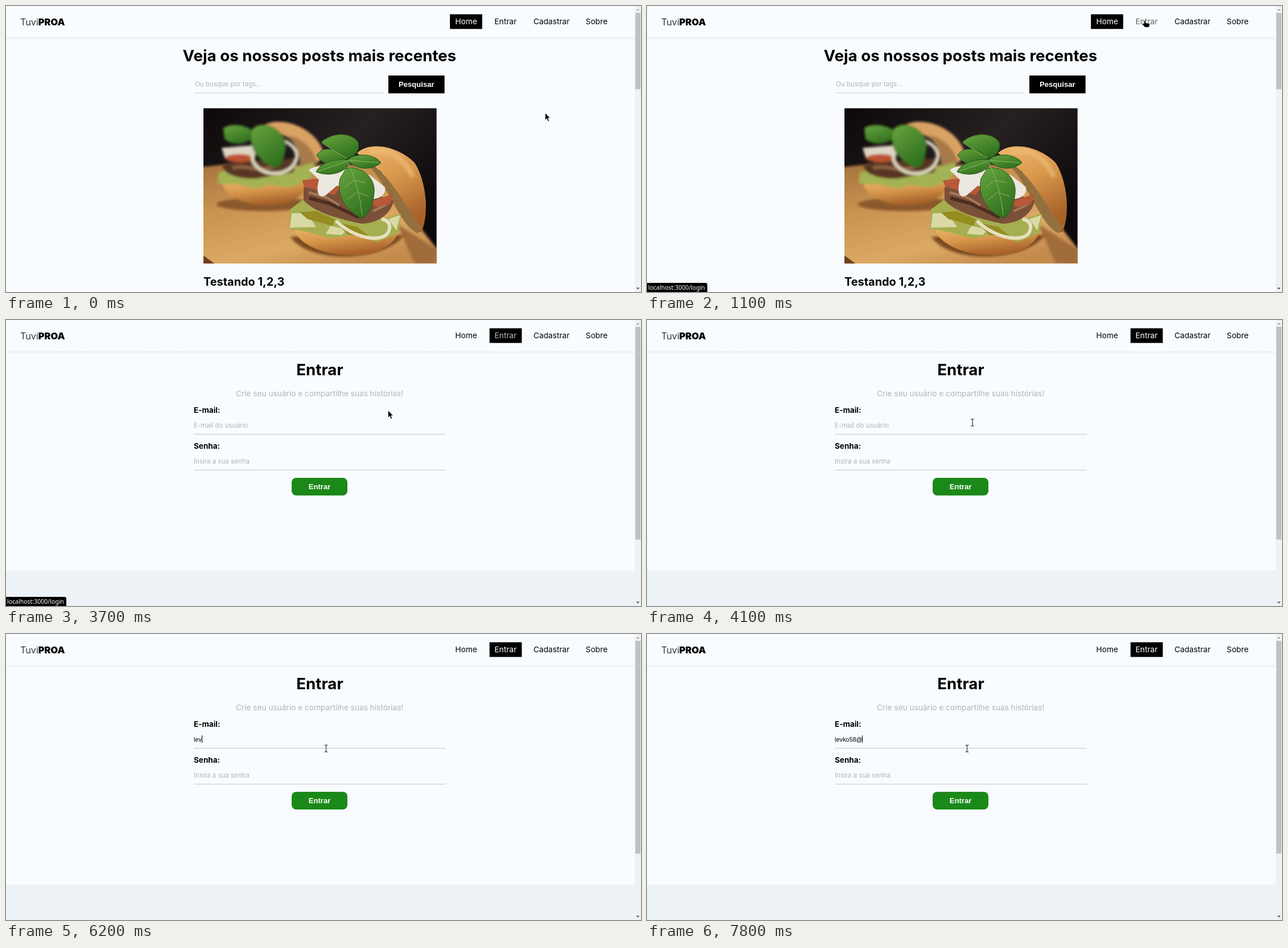
Recreate the animation shown at these times as an HTML page. Size 1116 px wide and 502 px high, loop 8 s.

```html
<!DOCTYPE html>
<html lang="pt">
<head>
<meta charset="utf-8">
<title>Blog</title>
<style>
html, body { margin: 0; width: 100%; height: 100%; overflow: hidden; background: #f8fcff; }
svg { display: block; }
text { font: 13.7px Inter, sans-serif; white-space: pre; }
.mid { text-anchor: middle; }
.h1 { font-size: 27.7px; font-weight: 700; }
.h2 { font-size: 19.9px; font-weight: 700; }
.label { font-size: 13.5px; font-weight: 700; }
.hint { font-size: 11.5px; fill: #b2b5b7; }
.button { font: 700 13.07px "Liberation Sans", Arial, sans-serif; fill: #fff; }
.typed { font: 10.89px "Liberation Sans", Arial, sans-serif; }
.line { stroke: #c4c8ca; }
.leaf { fill: url(#leaf); stroke: #28591a; }
</style>
</head>
<body>
<svg width="1116" height="502" viewBox="0 0 1116 502">
  <defs>
    <linearGradient id="dark" x2="1" y2=".6">
      <stop stop-color="#0d0809"/><stop offset=".55" stop-color="#272021"/><stop offset="1" stop-color="#0c090a"/>
    </linearGradient>
    <linearGradient id="wood" x2=".6" y2="1">
      <stop stop-color="#a5733f"/><stop offset=".35" stop-color="#c8924f"/><stop offset=".75" stop-color="#dba965"/><stop offset="1" stop-color="#c48b4c"/>
    </linearGradient>
    <linearGradient id="bun" x2=".4" y2="1">
      <stop stop-color="#edb86f"/><stop offset=".5" stop-color="#d8964a"/><stop offset="1" stop-color="#a7622a"/>
    </linearGradient>
    <linearGradient id="leaf" x2=".6" y2="1">
      <stop stop-color="#68a53f"/><stop offset="1" stop-color="#31701f"/>
    </linearGradient>
    <linearGradient id="shade" x2="0" y2="1">
      <stop stop-color="#e9eef1"/><stop offset="1" stop-color="#f8fcff"/>
    </linearGradient>
    <filter id="soft"><feGaussianBlur stdDeviation="2"/></filter>
    <filter id="crisp"><feGaussianBlur stdDeviation=".6"/></filter>
    <clipPath id="frame"><path d="M347 179.500H756.700V452H347Z"/></clipPath>
  </defs>

  <rect width="1116" height="502" fill="#f8fcff"/>
  <rect y="55" width="1105" height="5" fill="url(#shade)"/>
  <text x="25" y="33.500" style="font-size:16.400px;font-weight:300">Tuvi<tspan font-weight="900">PROA</tspan></text>

  <rect id="active" y="14.500" width="56.700" height="25.800"/>
  <text id="home" class="mid" x="808.700" y="32">Home</text>
  <text id="enter" class="mid" x="878" y="32">Entrar</text>
  <text class="mid" x="958.700" y="32">Cadastrar</text>
  <text class="mid" x="1038" y="32">Sobre</text>

  <g id="posts">
    <text class="mid h1" x="551" y="97">Veja os nossos posts mais recentes</text>
    <text class="hint" x="332" y="141">Ou busque por tags...</text>
    <path class="line" d="M332 152.500H664"/>
    <rect x="672" y="122" width="98.700" height="31.300"/>
    <text class="mid button" x="721.300" y="142">Pesquisar</text>
    <text class="h2" x="347" y="490.500">Testando 1,2,3</text>
    <g clip-path="url(#frame)">
      <rect x="347" y="179" width="410" height="274" fill="url(#dark)"/>
      <path d="M340 283L378 279H640L690 340L764 435V460H340Z" fill="url(#wood)" filter="url(#soft)"/>
      <path d="M688 383L757 428V452H718Z" fill="#a06c3a" filter="url(#soft)"/>
      <path d="M340 433L372 456H340Z" fill="#6b401d"/>
      <g filter="url(#soft)">
        <ellipse cx="455" cy="348" rx="85" ry="12" fill="#8a5829"/>
        <path d="M453 209C480 194 545 208 560 262L545 277C525 248 490 225 453 209Z" fill="#d9a264"/>
        <path d="M492 228C510 225 540 245 547 276L516 292C519 260 510 240 492 228Z" fill="#a87a48"/>
        <path d="M379 309C386 338 425 350 460 349C500 348 527 335 532 305Z" fill="url(#bun)"/>
        <path d="M374 292C395 285 490 296 541 274C548 296 527 316 490 318L462 314L440 321L410 313L372 312Z" fill="#a3b352"/>
        <path d="M381 279C400 268 480 275 513 265L505 292L440 303C410 304 380 296 381 279Z" fill="#593622"/>
        <path d="M398 284C420 278 440 292 470 283" fill="none" stroke="#8e6345" stroke-width="6"/>
        <path d="M379 249L440 244L437 272L385 268Z" fill="#ddd6c4"/>
        <ellipse cx="410" cy="267" rx="25" ry="7" fill="#bd5231"/>
        <ellipse cx="472" cy="264" rx="39" ry="30" fill="none" stroke="#dcd6bd" stroke-width="6"/>
        <path class="leaf" d="M382 214C400 204 425 210 438 222C437 240 400 249 384 233Z"/>
        <path class="leaf" d="M431 219C450 193 497 220 491 250C488 275 481 284 474 284C449 277 425 252 431 219Z"/>
      </g>
      <g filter="url(#crisp)">
        <path d="M500 405C530 452 660 452 700 402Z" fill="#7d4c23" filter="url(#soft)"/>
        <path d="M617 258C641 236 690 247 718 275C738 305 745 365 730 397C710 400 693 360 660 292Z" fill="url(#bun)"/>
        <path d="M640 256C670 247 700 266 715 300" fill="none" stroke="#efc17d" stroke-width="9" opacity=".6" filter="url(#soft)"/>
        <path d="M640 279C675 294 700 350 731 390L723 399C695 385 685 345 640 279Z" fill="#94703f"/>
        <path d="M507 391C512 419 560 439 613 437C660 435 691 414 690 388Z" fill="url(#bun)"/>
        <path d="M499 357L522 340L575 362L640 378L694 365L690 398L653 414L610 402L570 408L532 397L498 391Z" fill="#a5af50"/>
        <path d="M502 364L529 363L545 388L499 389ZM672 374L693 367L686 394ZM570 386L600 392L590 402L562 400Z" fill="#d9d9a6"/>
        <path d="M516 362L545 360L578 374L574 386L530 374ZM578 379L618 388L638 404L602 402Z" fill="#968c22"/>
        <path d="M523 318C560 313 650 328 681 342C679 359 659 382 624 382C588 374 544 364 523 341Z" fill="#7b5039"/>
        <path d="M533 337L570 347L620 371" fill="none" stroke="#4d2d1f" stroke-width="6"/>
        <path d="M532 327L565 337L586 350M645 360L668 349" fill="none" stroke="#a67a59" stroke-width="4"/>
        <path d="M520 306L547 303L588 318L577 332L524 317ZM639 344L680 330L675 348L650 353Z" fill="#b85838"/>
        <path d="M532 288C552 272 590 287 640 297L666 318C669 337 645 343 630 336L582 315L561 333C545 339 546 319 550 305Z" fill="#ece8e0"/>
        <path d="M580 377C610 408 669 420 674 391Q676 377 660 374" fill="none" stroke="#e5e1c1" stroke-width="6"/>
        <path class="leaf" d="M554 239C575 220 609 222 619 240C623 258 606 268 596 267Z"/>
        <path class="leaf" d="M546 262C556 244 584 250 598 268C582 286 558 281 546 262Z"/>
        <path class="leaf" d="M545 291C552 275 579 267 606 270C602 291 570 302 545 291Z"/>
        <path class="leaf" d="M600 270C617 256 648 260 659 275C642 290 615 288 600 270Z"/>
        <path class="leaf" d="M598 285C624 279 650 301 647 328C645 352 635 369 626 373C599 361 580 335 587 303Z"/>
        <path d="M602 277Q622 322 626 367M612 306L595 318M618 326L600 340M612 306L632 310M619 328L638 334M556 241L600 268M549 290L604 271M602 271L655 275" fill="none" stroke="#8abb60"/>
      </g>
    </g>
  </g>

  <g id="login">
    <text class="mid h1" x="551.500" y="97">Entrar</text>
    <text class="mid" x="551.200" y="134" fill="#b2b5b7">Crie seu usuário e compartilhe suas histórias!</text>
    <text class="label" x="330" y="163">E-mail:</text>
    <text id="hint" class="hint" x="330" y="188.500">E-mail do usuário</text>
    <text id="typed" class="typed" x="330" y="188.500"></text>
    <rect id="caret" y="178" width="1" height="13"/>
    <path class="line" d="M330 200.500H773M330 263.500H773"/>
    <text class="label" x="330" y="226">Senha:</text>
    <text class="hint" x="330" y="251.500">Insira a sua senha</text>
    <rect x="502" y="277" width="98" height="31" rx="8" fill="#1b8919"/>
    <text class="mid button" x="551" y="297">Entrar</text>
    <rect y="440" width="1105" height="62" fill="#edf2f6"/>
  </g>

  <rect x="1105" width="11" height="502" fill="#f1f1f1"/>
  <rect id="thumb" x="1106" y="12" width="9" fill="#c1c1c1"/>
  <path d="M1107.500 8L1110.500 5L1113.500 8Z" fill="#a3a3a3"/>
  <path d="M1107.500 494.500L1110.500 497.500L1113.500 494.500Z" fill="#505050"/>

  <g id="status">
    <path d="M0 486H103Q106 486 106 489V502H0Z"/>
    <text x="2" y="498" fill="#fff" style="font:10.500px 'Noto Sans',sans-serif">localhost:3000/login</text>
  </g>

  <g id="cursor" stroke="#fff" stroke-linejoin="round">
    <path id="arrow" d="M.5 .5V13.500L3.500 10.800L5.600 15.700L7.800 14.700L5.700 9.900H9.500Z" stroke-width=".8"/>
    <path id="hand" d="M-1.500 .5Q0 -.5 .8 1V4.500L7 5.500Q8.300 6 7.800 8.500L6.300 12.500H-.5L-6 6.500Q-5.500 5 -2.500 6Z" stroke-width=".8"/>
    <g id="beam" fill="none">
      <path d="M-3 -6H-1L0 -5L1 -6H3M0 -5V5M-3 6H-1L0 5L1 6H3" stroke-width="3"/>
      <path d="M-3 -6H-1L0 -5L1 -6H3M0 -5V5M-3 6H-1L0 5L1 6H3" stroke="#333" stroke-width="1.200"/>
    </g>
  </g>
</svg>
<script>
const LOOP = 8000, LOGIN = 3700, EMAIL = 'levko58@';
const $ = id => document.getElementById(id);
const show = (id, on) => { $(id).style.display = on ? '' : 'none'; };

// [time, x, y]
const moves = [
  [300, 947, 187], [400, 943, 179], [600, 915, 109], [800, 880, 44], [900, 877, 31],
  [1200, 875, 22], [3600, 875, 22], [3700, 671, 158], [3800, 645, 166], [3900, 645, 166],
  [4000, 590, 177], [4100, 572, 180], [4200, 572, 180], [4300, 562.5, 200.5], [4500, 562.5, 201]
];
// [time, characters typed]
const keys = [[5500, 1], [5800, 2], [6200, 3], [6600, 5], [7300, 6], [7600, 7], [7800, 8]];

const progress = (t, from, to) => Math.min(1, Math.max(0, (t - from) / (to - from)));
const grey = v => `rgb(${v},${v},${v})`;

function pointer(t) {
  const i = moves.findIndex(m => m[0] > t);
  if (i === 0) return moves[0].slice(1);
  if (i < 0) return moves[moves.length - 1].slice(1);
  const [t0, x0, y0] = moves[i - 1], [t1, x1, y1] = moves[i], k = progress(t, t0, t1);
  return [x0 + (x1 - x0) * k, y0 + (y1 - y0) * k];
}

function draw(t) {
  const login = t >= LOGIN;
  show('posts', !login);
  show('login', login);
  show('status', t >= 1000 && t < 4000);
  $('active').setAttribute('x', login ? 849.8 : 780.2);
  $('thumb').setAttribute('height', login ? 373.5 : 134);
  $('home').style.fill = login ? '#000' : '#fff';
  $('enter').style.fill = grey(login ? 187 + 68 * progress(t, 3900, 4100) : 195 * progress(t, 900, 1300));

  const count = keys.reduce((n, [at, c]) => t >= at ? c : n, 0);
  $('typed').textContent = EMAIL.slice(0, count);
  show('hint', !count);
  show('caret', t >= 4900 && !(t >= 7100 && t < 7300));
  const width = login && count ? $('typed').getComputedTextLength() : 0;
  $('caret').setAttribute('x', 330 + Math.floor(width + .3));

  const shape = t >= 4000 ? 'beam' : t >= 900 && !login ? 'hand' : 'arrow';
  for (const id of ['arrow', 'hand', 'beam']) show(id, id === shape);
  $('cursor').setAttribute('transform', `translate(${pointer(t)})`);
}

const start = performance.now();
function tick() {
  const t = (performance.now() - start) % LOOP;
  draw(Math.floor(t / 100) * 100);
  requestAnimationFrame(tick);
}
tick();
</script>
</body>
</html>
```
